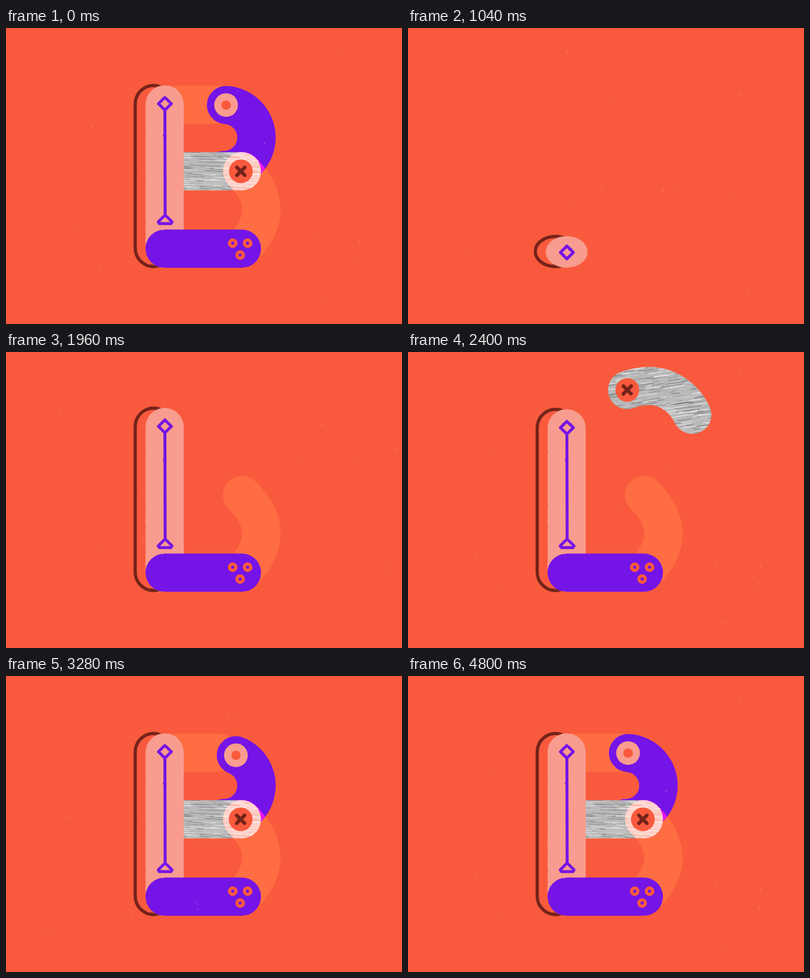
Write an HTML page that moves like this. It is 800x600 px and loops after 4.84 s.

```html
<!DOCTYPE html>
<html lang="en">
<head>
<meta charset="utf-8">
<title>Letter B</title>
<style>
html, body { margin: 0; width: 100%; height: 100%; overflow: hidden; background: #f95a3d; }
svg { display: block; width: 100vw; height: 100vh; }
.band { fill: none; stroke-width: 77.5; stroke-linecap: round; }
.line { fill: none; stroke: #7514e6; stroke-width: 6; stroke-linejoin: round; stroke-linecap: round; }
.ground { fill: #f95a3d; }
.screen { mix-blend-mode: screen; }
</style>
</head>
<body>
<svg viewBox="0 0 800 600" xmlns="http://www.w3.org/2000/svg">
  <defs>
    <filter id="rough" filterUnits="userSpaceOnUse" x="230" y="-20" width="430" height="540" color-interpolation-filters="sRGB">
      <feTurbulence type="fractalNoise" baseFrequency="0.14" numOctaves="2" seed="4"/>
      <feDisplacementMap in="SourceGraphic" scale="1.8" xChannelSelector="R" yChannelSelector="G"/>
    </filter>
    <mask id="snakeMask" maskUnits="userSpaceOnUse" x="0" y="0" width="800" height="600">
      <path id="snake" class="band" stroke="#fff"/>
    </mask>
    <mask id="lowMask" maskUnits="userSpaceOnUse" x="0" y="0" width="800" height="600">
      <path class="band low" stroke="#fff"/>
    </mask>
  </defs>
  <rect class="ground" width="800" height="600"/>
  <g filter="url(#rough)">
    <rect id="outline" fill="none" stroke="#74231a" stroke-width="6.5"/>
    <path id="top" class="band" stroke="#ff6d42"/>
    <path class="band low" stroke="#ff6d42"/>
    <g id="arc">
      <path class="band bow" stroke="#7514e6"/>
      <g mask="url(#lowMask)"><path class="band bow" stroke="#e814f0"/></g>
      <g id="eye"><circle r="24" fill="#f89c8f"/><circle class="ground" r="9.5"/></g>
    </g>
    <g id="wood">
      <g mask="url(#snakeMask)">
        <rect x="270" y="0" width="400" height="345" fill="#b9b9b9"/>
        <g id="grain" fill="none"></g>
        <g class="screen" mask="url(#lowMask)"><rect class="ground" x="400" y="200" width="180" height="300"/></g>
      </g>
      <g id="button">
        <circle class="ground" r="24"/>
        <path d="M-8 -8L8 8M8 -8L-8 8" stroke="#74231a" stroke-width="7" stroke-linecap="round"/>
      </g>
    </g>
    <rect id="stem" fill="#f89c8f"/>
    <path id="rod" class="line"/>
    <path id="diamond" class="line" d="M0 -13L13 0L0 13L-13 0Z"/>
    <path id="tri" class="line" d="M0 -14L14 0L11.5 3.5H-11.5L-14 0Z"/>
    <g id="base">
      <rect id="bar" fill="#7514e6"/>
      <g id="rings" fill="none" stroke="#f95a3d" stroke-width="6.5">
        <circle cx="-18.5" cy="-11" r="6.4"/><circle cx="11.5" cy="-11" r="6.4"/><circle cx="-3.5" cy="13" r="6.4"/>
      </g>
    </g>
  </g>
  <path id="dust" stroke="#ffb595" stroke-width="1.6" stroke-linecap="round"/>
</svg>
<script>
const LOOP = 4840, STEP = 40, BODY = 156, FLOOR = 486, BALL = 77;
const $ = id => document.getElementById(id);
const set = (el, o) => { for (const k in o) el.setAttribute(k, o[k]); };
const show = (el, on) => el.setAttribute('visibility', on ? 'visible' : 'hidden');
const move = (el, x, y, s = 1) => el.setAttribute('transform', `translate(${x} ${y}) scale(${s})`);

const clamp = v => Math.max(0, Math.min(1, v));
const mix = (a, b, u) => a + (b - a) * u;
const ramp = (t, a, b) => clamp((t - a) / (b - a));
const easeIn = (t, a, b) => ramp(t, a, b) ** 2;
const easeOut = (t, a, b, p = 2) => 1 - (1 - ramp(t, a, b)) ** p;
const smooth = (t, a, b) => { const u = ramp(t, a, b); return u * u * (3 - 2 * u); };
const bump = (t, a, b) => Math.sin(Math.PI * ramp(t, a, b));
const spring = (t, half, decay) => 1 - Math.exp(-decay * t) * Math.cos(Math.PI * t / half);

let seed = 7;
const rnd = (a, b) => a + (b - a) * ((seed = seed * 16807 % 2147483647) / 2147483647);
const repeat = (n, f) => Array.from({ length: n }, f);

// Paths
const flight = 'M477 290C570 275 604 196 576 131C559 92 525 69 487 69C470 69 456 72 443 77';
const snake = $('snake');
set(snake, { d: flight });
const flown = snake.getTotalLength();
set(snake, { d: flight + 'C380 98 320 140 320 210V255C320 275 328 290.5 344 290.5H476.5' });
const total = snake.getTotalLength();

const lows = document.querySelectorAll('.low'), bows = document.querySelectorAll('.bow');
lows.forEach(p => set(p, { d: 'M476.5 447C529 395 529 342 477 290' }));
const lowLen = lows[0].getTotalLength();

// Wood grain: slanted in the air, level in the bar
repeat(6, (_, i) => {
  const g = 95 + 27 * i;
  const d = repeat(170 + 20 * i, () => {
    const x = rnd(325, 635), y = rnd(15, 335), len = rnd(6, 48);
    const rise = len * (y < 240 ? -.15 : .04);
    return `M${x} ${y}q${len / 2} ${rise / 2 + rnd(-2, 2)} ${len} ${rise}`;
  }).join('');
  const p = document.createElementNS('http://www.w3.org/2000/svg', 'path');
  set(p, { d, stroke: `rgb(${g},${g},${g})`, 'stroke-width': .8 + (i % 3) * .3 });
  $('grain').append(p);
});

// Sheets of specks, shown in turn
const dust = repeat(5, () => repeat(10, () => `M${rnd(2, 797)} ${rnd(8, 561)}h.1`).join(''));

// Top and bottom of the stem: fold to a ball, hop, land, spring up
function stemSpan(t) {
  if (t < 560) return [mix(116, 21, easeIn(t, 320, 560)), mix(FLOOR, 102, smooth(t, 320, 560))];
  if (t > 1160) return [mix(FLOOR - BALL, 116, spring(t - 1160, 260, .0058)), FLOOR];
  const y = Math.min(FLOOR - BALL, 25 * ((t - 640) / 80) ** 2 - 4);
  const squash = 14 * bump(t, 965, 1085), stretch = 4 * (1 - ramp(t, 560, 640));
  return [y + squash, y + BALL + stretch];
}

function drawStem(t) {
  const [y, end] = stemSpan(t), h = end - y;
  const grow = Math.max(0, BALL - h) * .3, wide = BALL + 2 * grow;
  const rx = wide / 2, ry = Math.min(38.5, h / 2);
  set($('stem'), { x: 282 - grow, y, width: wide, height: h, rx, ry });
  set($('outline'), { x: 261 - grow, y: y + .5, width: wide - 3, height: h - 3, rx: rx - 1.5, ry: ry - 1 });

  const dy = y + mix(h / 2 + 1, 37.5, ramp(h, 81, 141));
  const s = ramp(h, 140, 230), ty = Math.max(dy + 28, end - 93);
  show($('tri'), s > 0);
  show($('rod'), s > 0);
  move($('diamond'), 321, dy);
  move($('tri'), 321.5, ty, s);
  set($('rod'), { d: `M321 ${dy + 14}L321.5 ${Math.max(dy + 14, ty - 15)}` });
}

function drawBar(t) {
  const reach = 1 - easeIn(t, 160, 280) + easeOut(t, 1190, 1500, 3);
  const size = 1 - easeIn(t, 260, 340) + easeOut(t, 1160, 1250);
  const h = 77.5 * size + 3.3 * bump(t, 1250, 1640), r = h / 2;
  const side = Math.min(38.7, r), cap = mix(320.5, 476.5, reach);
  show($('base'), h > 1);
  set($('bar'), { x: 320.5 - side, y: FLOOR - h, width: cap - 320.5 + 2 * side, height: h, rx: r });
  move($('rings'), cap, FLOOR - r, Math.min(1, size));
}

function drawWood(t) {
  const on = t < 300 || t > 2160;
  show($('wood'), on);
  if (!on) return;
  const s = t < 300 ? total - 160 * easeIn(t, 40, 300)
    : flown * ramp(t, 2160, 2400) + (total - flown) * easeOut(t, 2400, 3480, 4);
  const tail = Math.max(0, s - BODY), p = snake.getPointAtLength(s);
  set(snake, { 'stroke-dasharray': `${s - tail} 3000`, 'stroke-dashoffset': -tail });
  move($('button'), p.x - 2 * ramp(s, flown, total), p.y);
}

function drawArcs(t) {
  const grown = 1 - easeIn(t, 40, 260) + easeOut(t, 1460, 1800);
  lows.forEach(p => {
    show(p, grown > .005);
    set(p, { 'stroke-dasharray': `${grown * lowLen + .1} 999` });
  });

  const reach = 1 - easeIn(t, 40, 270) + easeOut(t, 2870, 3480);
  show($('top'), reach > .005);
  set($('top'), { d: `M320 155.5H${mix(320, 444, reach)}` });

  const turn = 1 - easeIn(t, 0, 220) + easeOut(t, 2850, 3480), deg = mix(90, -86, turn);
  const at = a => [440 + 66 * Math.cos(a * Math.PI / 180), 222 + 66 * Math.sin(a * Math.PI / 180)];
  const from = at(Math.max(deg + .1, Math.min(90, 108 - deg))), to = at(deg);
  show($('arc'), turn > .06);
  bows.forEach(p => set(p, { d: `M${from}A66 66 0 0 0 ${to}` }));
  move($('eye'), ...to);
}

function draw(ms) {
  const t = Math.floor(ms % LOOP / STEP + .01) * STEP;
  drawArcs(t);
  drawWood(t);
  drawStem(t);
  drawBar(t);
  set($('dust'), { d: dust[Math.floor(t / 80) % dust.length] });
}

let start;
function tick(now) {
  if (start === undefined) start = now;
  draw(now - start);
  requestAnimationFrame(tick);
}
draw(0);
requestAnimationFrame(tick);
</script>
</body>
</html>
```
